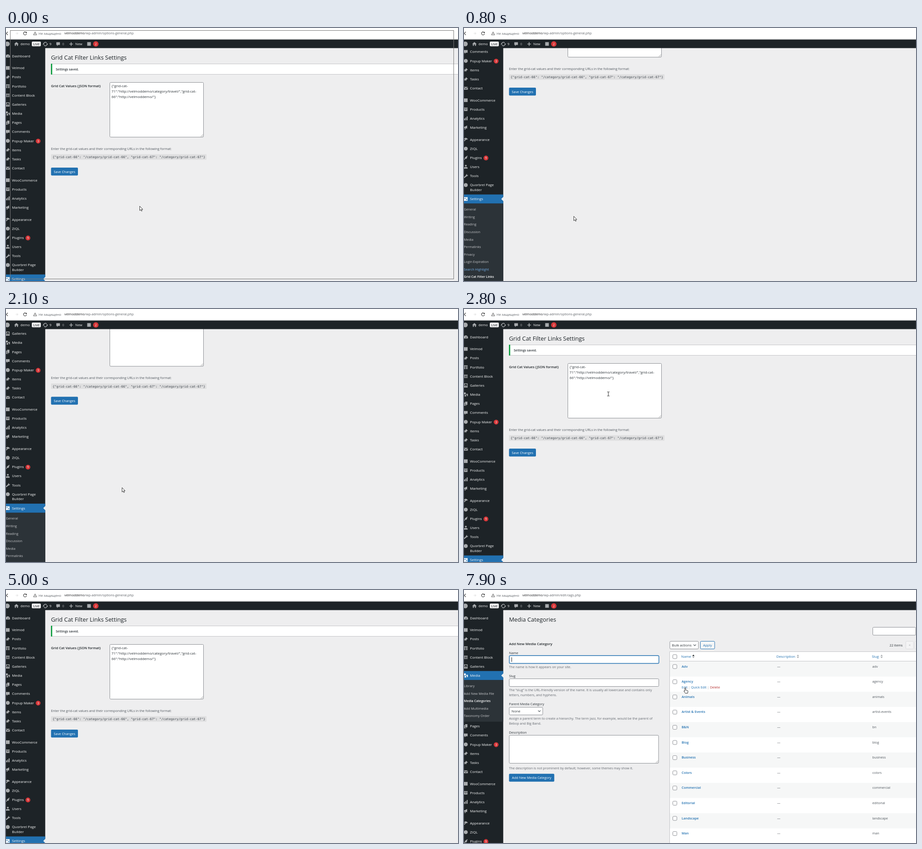
These frames come from a looping animation (999 by 560 pixels, 8 s). An HTML page with a canvas:

```html
<!DOCTYPE html>
<html lang="en">
<head>
<meta charset="utf-8">
<title>Admin settings walkthrough</title>
<style>
  html, body { margin: 0; width: 999px; height: 560px; overflow: hidden; }
  canvas { display: block; }
</style>
</head>
<body>
<canvas id="stage" width="999" height="560"></canvas>
<script>
const ctx = document.getElementById('stage').getContext('2d');
const SANS = '"Open Sans", "Noto Sans", sans-serif';
const MONO = '"DejaVu Sans Mono", monospace';
const DARK = '#1d2327', BLUE = '#2271b1', PAGE = '#eeeeef', EDGE = '#8c8f94',
      LINE = '#c3c4c7', ICON = '#a7aaad', INK = '#2c3338', SOFT = '#646970', RED = '#d63638';
const LOOP = 8000, SWITCH = 5700;

// Helpers; text y is the optical middle of the line.
function text(s, x, y, { size = 7.3, color = INK, weight = 400, font = SANS, align = 'left' } = {}) {
  ctx.font = `${weight} ${size}px ${font}`;
  ctx.fillStyle = color;
  ctx.textAlign = align;
  ctx.fillText(s, x, y + size * 0.36);
  return ctx.measureText(s).width;
}
function rect(x, y, w, h, color) {
  ctx.fillStyle = color;
  ctx.fillRect(x, y, w, h);
}
function box(x, y, w, h, { fill = '#fff', stroke = EDGE, r = 2, lw = 1 } = {}) {
  ctx.beginPath();
  ctx.roundRect(x, y, w, h, r);
  ctx.fillStyle = fill;
  ctx.fill();
  ctx.lineWidth = lw;
  ctx.strokeStyle = stroke;
  if (lw) ctx.stroke();
}
function disc(x, y, r, color) {
  ctx.beginPath();
  ctx.arc(x, y, r, 0, 7);
  ctx.fillStyle = color;
  ctx.fill();
}
function shape(d, x, y, fill, stroke, lw = 1) {
  const p = new Path2D(d);
  ctx.save();
  ctx.translate(x, y);
  if (fill) { ctx.fillStyle = fill; ctx.fill(p, 'evenodd'); }
  if (stroke) { ctx.strokeStyle = stroke; ctx.lineWidth = lw; ctx.stroke(p); }
  ctx.restore();
}
function badge(n, x, y, r = 5.3) {
  disc(x, y, r, RED);
  text(n, x, y, { size: 6.3, color: '#fff', align: 'center' });
}
function button(s, x, y, w) {
  box(x, y, w, 17.5, { fill: BLUE, lw: 0 });
  text(s, x + w / 2, y + 9, { size: 7.4, color: '#fff', align: 'center' });
}
const chevron = (x, y) => shape('M-2.7-1.4L0 1.4 2.7-1.4', x, y, null, '#50575e', 1.2);

const icons = {
  gauge: 'M-4.3 3.3a4.8 4.8 0 1 1 8.6 0zM-.7 2L2-2 .8 2z',
  square: 'M-4-4h8v8h-8z',
  circle: 'M-4.3 0a4.3 4.3 0 1 0 8.6 0a4.3 4.3 0 1 0-8.6 0z',
  pin: 'M.5-4.5L4.5-.5 3 0 1 2 .5 4-1.5 2-4.5 4.5-2.5 1-4-.5-2-1 0-3z',
  grid: 'M-4-4h8v2h-8zM-4-1h3v2h-3zM0-1h4v2h-4zM-4 2h3v2h-3zM0 2h4v2h-4z',
  block: 'M-4-3.5h8v2h-8zM-4-.5h3.5v1.5h-3.5zM.5-.5h3.5v1.5h-3.5zM-4 2h8v1.5h-8z',
  gallery: 'M-4-4.5h8v9h-8zM-2.7-3v5h5.4v-5zM-2 1.5L0-1 2 1.5z',
  media: 'M-4-4.5h4v4h-4zM1-1.5h3.5v5h-2v-3h-1.5zM-2.5 .5h3v4h-3z',
  pages: 'M-1.5-4.5h5v7h-5zM-4-2.5h1.5v6h4v1h-5.5z',
  comment: 'M-4-4h8v6h-4l-2.3 2.5v-2.5h-1.7z',
  mail: 'M-4.5-3h9l-4.5 3.5zM-4.5-1.8v5h9v-5l-4.5 3.5z',
  archive: 'M-4-3.7h8v2h-8zM-3.7-1h7.4v4.7h-7.4zM-1.5 0v1h3v-1z',
  bars: 'M-4 0h2v4h-2zM-1-2h2v6h-2zM2-4.5h2v8.5h-2z',
  horn: 'M-4-1L3-4.5v7l-3.5-1v3h-2v-3.5l-1.500-.5z',
  brush: 'M-4-2L0-4 4.3-1.500 2.500 .8 .8 0-3 4-4 3-2 0z',
  plug: 'M3.500-4.500l.8 .8-2 2 1 1-2 3h-2.500l-2.500 2.500-.8-.8 2.300-2.500v-2l3-2.500z',
  user: 'M-2-2.500a2 2 0 1 0 4 0a2 2 0 1 0-4 0zM-4 4v-1.500q0-2 4-2t4 2v1.500z',
  wrench: 'M-4.500 3.300l5-5q-.4-2.500 2.500-2.800l-1 2 1 1 1.700-1q.3 3-3 3.200l-5 4z',
  sliders: 'M-4-4h8v8h-8zM-2.500-2.500v3h1.500v-3zM1-.5v3h1.500v-3z'
};

// "gap" starts a new group.
const menu = [
  ['Dashboard', 'gauge'], 'gap',
  ['Velmod', 'square'], ['Posts', 'pin'], ['Portfolio', 'grid'], ['Content Block', 'block'],
  ['Galleries', 'gallery'], ['Media', 'media'], ['Pages', 'pages'], ['Comments', 'comment'],
  ['Popup Maker', 'circle', '3', 71], ['items', 'pin'], ['Tasks', 'pin'], ['Contact', 'mail'], 'gap',
  ['WooCommerce', 'square'], ['Products', 'archive'], ['Analytics', 'bars'], ['Marketing', 'horn'], 'gap',
  ['Appearance', 'brush'], ['ZIQL', 'circle'], ['Plugins', 'plug', '9', 48.5], ['Users', 'user'],
  ['Tools', 'wrench'], ['Quorbrel Page\nBuilder', 'circle'], ['Settings', 'sliders']
];
const submenus = {
  Settings: ['General', 'Writing', 'Reading', 'Discussion', 'Media', 'Permalinks', 'Privacy',
    'Login Expiration', 'Search Highlight', 'Grid Cat Filter Links'],
  Media: ['Library', 'Add New Media File', 'Media Categories', 'Add Multimedia', 'Taxonomy Order']
};

function sidebar(current, active) {
  rect(0, 0, 86.7, 900, DARK);
  let y = 62;
  for (const item of menu) {
    if (item === 'gap') { y += 6.3; continue; }
    const [label, icon, count, badgeX] = item, on = label === current;
    if (on) {
      rect(0, y - 10, 86.7, 20, BLUE);
      shape('M0-4.700L-4.700 0 0 4.700z', 87, y, PAGE);
    }
    shape(icons[icon], 4, y, on ? '#fff' : ICON);
    const lines = label.split('\n');
    lines.forEach((s, i) => text(s, 13.3, y + i * 10.7, { size: 7.8, color: '#f6f7f7' }));
    if (count) badge(count, badgeX, y + 0.5);
    y += 20.17 + (lines.length - 1) * 10.7;
    if (!on) continue;
    const subs = submenus[current], height = subs.length * 16.6 + 9;
    rect(0, y - 10, 86.7, height, '#2c3338');
    subs.forEach((s, i) => text(s, -0.3, y + 2.8 + i * 16.6, s === active
      ? { size: 7.05, color: '#fff', weight: 600 }
      : { color: s === 'Search Highlight' ? '#72aee6' : '#c3c4c7' }));
    y += height;
  }
}

function settingsPage() {
  text('Grid Cat Filter Links Settings', 99.5, 65.5, { size: 12.85, color: DARK });
  box(100, 79.5, 910, 23, { stroke: LINE, r: 0 });
  rect(99.5, 79, 2.6, 24, '#009a36');
  text('Settings saved.', 110, 91, { size: 7.05, weight: 600 });
  text('Grid Cat Values (JSON format)', 99.5, 128.5, { size: 7.65, weight: 600, color: DARK });
  box(229.5, 120.5, 207, 121);
  shape('M-5 0L0-5M-2 0L0-2', 435.5, 240.5, null, '#777', 0.7);
  ['{"grid-cat-', '71":"http://velmoddemo/category/travel/","grid-cat-', '66":"http://velmoddemo/"}']
    .forEach((s, i) => text(s, 233.3, 128.3 + i * 11.8, { size: 7.84 }));
  text('Enter the grid-cat values and their corresponding URLs in the following format:',
    99.5, 267.3, { color: '#50575e' });
  rect(99.5, 279.5, 343.5, 12, '#dfdfe0');
  text('{"grid-cat-66": "/category/grid-cat-66", "grid-cat-67": "/category/grid-cat-67"}',
    103, 285.7, { size: 7, font: MONO, color: '#3c434a' });
  button('Save Changes', 99.5, 309, 59.5);
}

const rows = ['Adv', 'Agency', 'Animals', 'Artist & Events', 'B&N', 'Blog', 'Business', 'Colors',
  'Commercial', 'Editorial', 'Landscape', 'Man'];
const slug = s => s.toLowerCase().replace(' & ', '-').replace('&', '');

function sortMark(x, y, sorted) {
  shape('M-2.500-.8L0-4 2.500-.8z', x, y, sorted ? DARK : ICON);
  shape('M-2.500 .8L0 4 2.500 .8z', x, y, ICON);
}
function checkbox(y) { box(461.5, y - 4.5, 9, 9); }

function formColumn(t) {
  const note = (s, y) => text(s, 99.5, y, { color: SOFT });
  const label = (s, y) => text(s, 99.5, y);
  text('Add New Media Category', 99.5, 119, { size: 7.9, weight: 600, color: DARK });
  label('Name', 139);
  box(100.2, 145.200, 330.5, 17.300, { stroke: BLUE, lw: 1.4 });
  if (t >= 5900 && Math.floor((t - 5900) / 500) % 2 === 0) rect(105, 149, 1, 10, '#222');
  note('The name is how it appears on your site.', 170.3);
  label('Slug', 190);
  box(100, 196.5, 330.5, 17);
  note('The “slug” is the URL-friendly version of the name. It is usually all lowercase and contains only', 221.5);
  note('letters, numbers, and hyphens.', 232.7);
  label('Parent Media Category', 252.7);
  box(100, 259.5, 74, 17);
  text('None', 105, 268, { size: 7.8 });
  chevron(166.5, 268);
  note('Assign a parent term to create a hierarchy. The term Jazz, for example, would be the parent of', 284.2);
  note('Bebop and Big Band.', 295.7);
  label('Description', 315.2);
  box(100, 321.5, 330, 62);
  shape('M-5 0L0-5M-2 0L0-2', 429, 382.5, null, '#777', 0.7);
  note('The description is not prominent by default; however, some themes may show it.', 394.2);
  button('Add New Media Category', 99.5, 406.8, 100);
}

function categoriesPage(t, mouse) {
  text('Media Categories', 99.5, 65.5, { size: 12.85, color: DARK });
  formColumn(t);
  box(903.5, 82.5, 95, 17.5);
  box(455, 113.5, 63, 17);
  text('Bulk actions', 459.5, 122.3, { size: 7.7 });
  chevron(510, 122);
  box(522.5, 113.5, 31.5, 17, { fill: '#f6f7f7', stroke: BLUE });
  text('Apply', 538.2, 122.3, { color: BLUE, align: 'center', size: 7.5 });
  text('22 items', 969.5, 122.3, { align: 'right' });
  box(976.5, 113.5, 17, 17, { fill: '#f3f3f4', stroke: '#dcdcde' });
  text('«', 985, 121.5, { size: 8, color: ICON, align: 'center' });
  box(996.5, 113.5, 17, 17, { fill: '#f3f3f4', stroke: '#dcdcde' });

  box(454.5, 136.5, 560, 440, { stroke: LINE, r: 0 });
  checkbox(147.5);
  [['Name', 480, 507], ['Description', 690.5, 738], ['Slug', 901.5, 923]].forEach(([s, x, mark], i) => {
    text(s, x, 147.5, { size: 7.8, color: BLUE });
    sortMark(mark, 147, !i);
  });
  rows.forEach((name, i) => {
    const top = 158 + i * 33.6, y = top + 11;
    if (i % 2 === 0) rect(455, top, 544, 33.6, '#f6f7f7');
    checkbox(y + 0.5);
    text(name, 481, y, { size: 7.35, weight: 600, color: BLUE });
    text('—', 692, y, { color: '#50575e' });
    text(slug(name), 902.5, y, { color: '#50575e' });
    if (mouse.x < 455 || mouse.y < top || mouse.y >= top + 33.6) return;
    let x = 481;
    [['Edit', BLUE], [' | ', ICON], ['Quick Edit', BLUE], [' | ', ICON], ['Delete', '#b32d2e']]
      .forEach(([s, color]) => { x += text(s, x, y + 13, { color }); });
  });
  rect(454, 157, 545, 1, LINE);
}

function browserBar(path) {
  rect(0, 0, 999, 26, '#fff');
  rect(0, 23.5, 999, 1, '#d5d6d8');
  shape('M4-3.500L.5 0 4 3.500', 0, 12, null, '#444', 1.1);
  shape('M-2.500 0h5M0-2.500L2.500 0 0 2.500', 24, 12, null, '#ddd');
  shape('M2.800-2A3.400 3.400 0 1 0 3.400 .8M3.400-3.600v2.300h-2.300', 42, 12, null, '#333', 1.1);
  shape('M0-3.500L3.800 3.200h-7.600zM0-1v2M0 1.600v.8', 64.3, 12, null, '#555', 0.9);
  text('Не защищено', 72, 12, { color: '#5f6368' });
  const w = text('velmoddemo', 129, 11.7, { color: '#202124' });
  text(path, 129 + w, 11.7, { color: '#5f6368' });
}

function adminBar() {
  rect(0, 25.5, 999, 19, DARK);
  const label = (s, x, color = '#f0f0f1') => text(s, x, 35.5, { size: 7.6, color });
  disc(3, 35.2, 5.2, ICON);
  shape('M0-4.500L5 0h-1.500v4h-2.300v-3h-2.400v3h-2.300v-4h-1.500z', 23, 35.5, ICON);
  label('demo', 32);
  box(57, 30, 20, 10.5, { fill: '#f0f0f1', lw: 0 });
  text('Live', 67, 35.3, { size: 7.6, color: DARK, align: 'center' });
  shape('M-4-.5a4 4 0 0 1 7-2M4 .5a4 4 0 0 1-7 2', 87, 35.5, null, ICON, 1.5);
  shape('M2-1h4l-2 3zM-6 1h4l-2-3z', 87, 35.5, ICON);
  label('9', 96);
  shape(icons.comment, 115.2, 35.5, ICON);
  label('0', 124.3, ICON);
  shape('M-4 0h8M0-4v8', 144, 35.5, null, ICON, 1.7);
  label('New', 153);
  shape(icons.square, 183.5, 35.3, ICON);
  badge('2', 198.5, 35.3, 6);
}

// Keys are [time, values...]; moves ease between neighbours.
function track(keys, t) {
  const i = keys.findIndex(k => k[0] > t);
  if (i < 0) return keys.at(-1).slice(1);
  if (!i) return keys[0].slice(1);
  const a = keys[i - 1], b = keys[i], u = (t - a[0]) / (b[0] - a[0]), e = u * u * (3 - 2 * u);
  return a.slice(1).map((v, j) => v + (b[j + 1] - v) * e);
}
const scrollKeys = [[0, 0], [100, 25], [300, 118], [500, 177], [1900, 177], [2400, 0]];
const mouseKeys = [[0, 295, 394], [300, 280, 396], [700, 265, 402], [1200, 45, 541], [1500, 45, 541],
  [1900, 254, 400], [2300, 258, 390], [2800, 319, 188], [3600, 255, 265], [4500, 60, 190],
  [4800, -20, 190], [5700, -20, 245], [6500, 472, 138], [6600, 472, 138], [7200, 489, 216]];

function cursor({ x, y }, first, scroll) {
  const inField = first && x > 230 && x < 436 && y + scroll > 121 && y + scroll < 241;
  const onLink = !first && x > 481 && x < 562 && y > 211 && y < 221;
  if (inField) {
    shape('M-2.500-4.500h2l.5 .5 .5-.5h2M0-4v8M-2.500 4.500h2l.5-.5 .5 .5h2', x, y, null, '#222');
  } else if (onLink || (x < 87 && y > 45)) {
    shape('M-1 1q1-1.500 2 0v4.500l4 1q1 .3 1 1.500l-.7 4.500h-5.300l-3-4.500q0-1.400 1.300-.8l.7 .8z',
      x, y, '#fff', '#222', 0.9);
  } else {
    shape('M.5 .3v9.700l2.200-2 1.600 3.300 1.600-.7-1.600-3.200h3z', x, y, '#fff', '#222', 0.9);
  }
}

function draw(t) {
  const first = t < SWITCH, [scroll] = track(scrollKeys, t), [x, y] = track(mouseKeys, t);
  const mouse = { x, y };
  rect(0, 0, 999, 560, PAGE);
  ctx.save();
  ctx.translate(0, -scroll);
  if (first) {
    settingsPage();
    sidebar('Settings', 'Grid Cat Filter Links');
  } else {
    categoriesPage(t, mouse);
    sidebar('Media', 'Media Categories');
  }
  ctx.restore();
  browserBar(first ? '/wp-admin/options-general.php' : '/wp-admin/edit-tags.php');
  adminBar();
  cursor(mouse, first, scroll);
  if (t < 100) {
    ctx.strokeStyle = '#777';
    ctx.lineWidth = 1;
    ctx.strokeRect(9.5, 5.5, 980, 550);
  }
}

const start = performance.now();
function frame() {
  const t = (performance.now() - start) % LOOP;
  draw(Math.floor(t / 100) * 100);
  requestAnimationFrame(frame);
}
frame();
</script>
</body>
</html>
```
